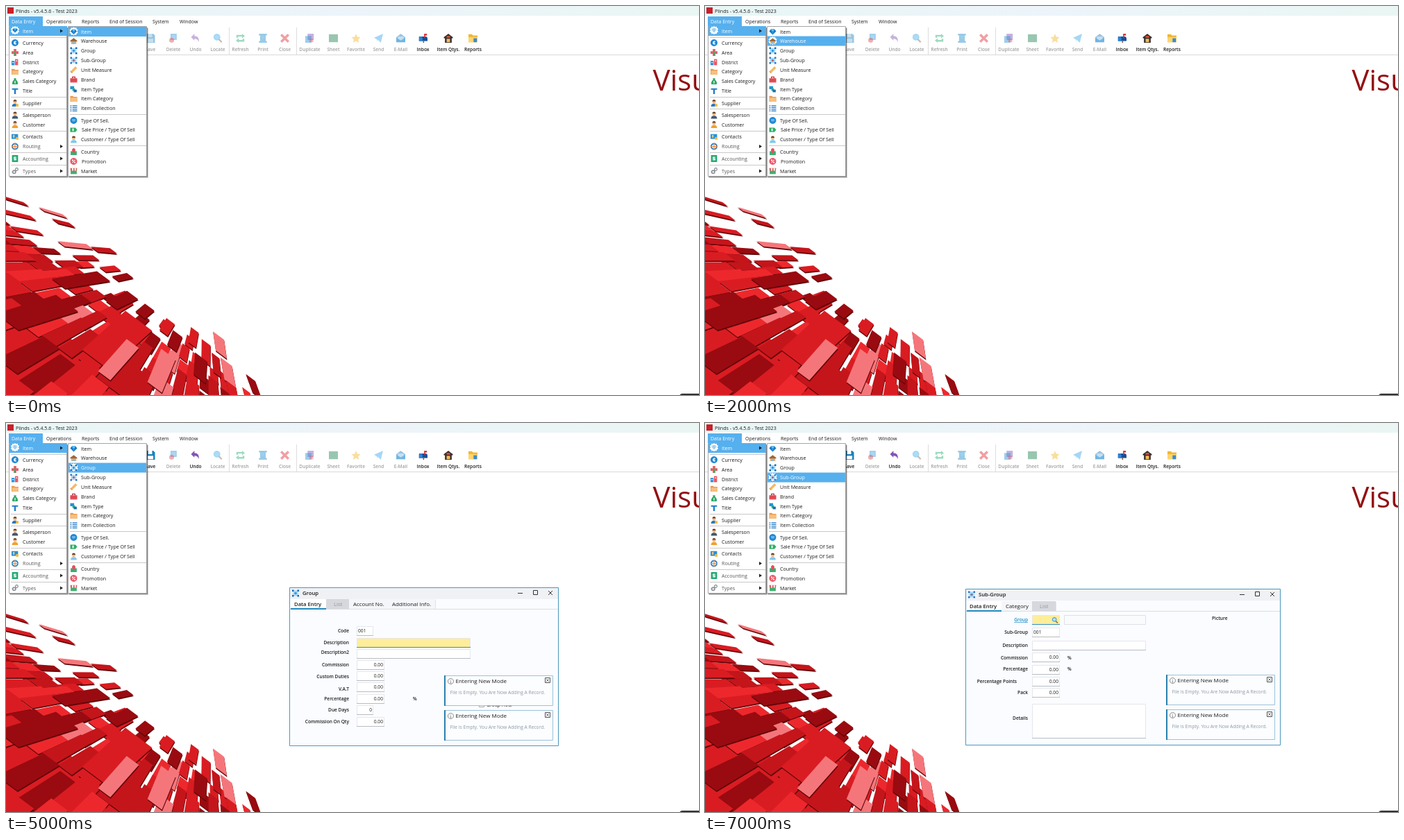
Recreate the animation shown at these times as an HTML page with a canvas. Size 998x561 px, loop 8 s.

```html
<!DOCTYPE html>
<html lang="en">
<head>
<meta charset="utf-8">
<style>
html, body { margin: 0; width: 100%; height: 100%; overflow: hidden; background: #fff; }
canvas { display: block; }
</style>
</head>
<body>
<canvas id="stage" width="998" height="561"></canvas>
<script>
const ctx = document.getElementById('stage').getContext('2d');
const BLUE = '#56b0ee', LINK = '#1a8ac6', INK = '#1c1c1c', GREY = '#999';

// Icons on a 16 x 16 grid: "colour path" layers joined by "|"
const DISC = 'M8 0A8 8 0 1 1 7.9 0Z';
const person = c => `${c} M1 16Q1 9 8 9T15 16Z|#f3b987 M8 1A4 4 0 1 1 7.9 1Z|#6b4226 M4 4Q4 0 8 0T12 4Z`;
const nodes = c => `#8fd0f5 M2 2H14V14H2Z|#fff M4 4H12V12H4Z|#2f9de4 M5 5H11V11H5Z|${c} M0 0H4V4H0ZM12 0H16V4H12ZM0 12H4V16H0ZM12 12H16V16H12Z`;
const ICONS = {
  gem: '#1678c8 M4 2H12L16 7 8 15 0 7Z|#5cc4f5 M4 2H12L10 7H6Z|#2f9de4 M6 7H10L8 15Z',
  halo: '#fff M8 -1L10 1 13 0 14 3 17 5 15 8 17 11 14 13 13 16 10 15 8 17 6 15 3 16 2 13 -1 11 1 8 -1 5 2 3 3 0 6 1Z',
  house: '#e3b06f M2 7H14V15H2Z|#a0673a M0 7L8 1 16 7V9H0Z|#8ab8d8 M5 10H11V15H5Z',
  group: nodes('#1769b5'),
  sub: nodes('#2b78c4') + '|#e45b5b M6 6H10V10H6Z',
  ruler: '#f4b966 M0 12L12 0 16 4 4 16Z|#d88b35 M0 12L1 11 5 15 4 16Z',
  bag: '#e4505a M0 5H16V15H0Z|#b8323d M4 5V1H12V5H10V3H6V5ZM0 9H16V10H0Z',
  type: '#2491d4 M0 1H9V8H0Z|#25ad83 M5 6H11V12H5Z|#1d6dac M8 9H15V15H8Z',
  folder: '#e99a4a M0 2H6L8 4H16V15H0Z|#f7c080 M1 6H16V15H1Z',
  list: '#2378c0 M0 1H3V3H0ZM5 1H16V3H5ZM0 5H3V7H0ZM5 5H16V7H5ZM0 9H3V11H0ZM5 9H16V11H5ZM0 13H3V15H0ZM5 13H16V15H5Z',
  badge: `#1f8ad6 ${DISC}|#fff M4 6H12V7H4ZM5 9H11V10H5Z`,
  coin: `#1c87d4 ${DISC}|#fff M11 4H8Q5 4 5 8T8 12H11V10H8V9H10V7H8V6H11Z`,
  cash: '#2eaf67 M0 3H12L16 8 12 13H0Z|#fff M5 5H8V11H5Z',
  area: '#e4606a M5 0H11V5H16V11H11V16H5V11H0V5H5Z|#48a860 M6 6H10V16H6Z',
  city: '#2b8fd8 M0 5H7V15H0Z|#e85a62 M8 1H15V15H8Z|#fff M10 4H13V6H10ZM2 8H5V10H2Z',
  money: '#2fa866 M5 1H11L10 4Q16 10 14 15H2Q0 10 6 4Z|#fff M7 7H9V13H7Z',
  title: '#1f7fca M1 2H15V5H10V15H6V5H1Z',
  supplier: person('#287bc1') + '|#f2bd3f M10 10H16V16H10Z',
  seller: person('#45566e'), customer: person('#f2a02f'), buyer: person('#7cc9ee'),
  contact: '#2590d8 M0 2H15V13H0Z|#f4c07f M3 4H7V10H3Z|#f5bd3e M10 9H16V15H10Z',
  route: `#2b87cc ${DISC}|#fff M8 3A5 5 0 1 1 7.9 3Z|#ef8a42 M7 0H9V16H7ZM0 7H16V9H0Z`,
  account: '#23a873 M1 0H15V16H1Z|#fff M6 4H11V6H7V7H11V12H5V10H9V9H5V4Z',
  gear: '#8c9299 M6 5A5 5 0 1 1 5.9 5ZM12 0A4 4 0 1 1 11.9 0Z|#fff M6 8A2 2 0 1 1 5.9 8ZM12 2A2 2 0 1 1 11.9 2Z',
  map: '#36ae73 M1 7H15V16H1Z|#e64e58 M8 12Q2 6 5 2T11 2 8 12Z',
  promo: `#ec5867 ${DISC}|#fff M4 11L11 4 12 5 5 12ZM4 4H7V7H4ZM9 9H12V12H9Z`,
  market: '#42ad70 M1 6H15V15H1Z|#e55a5a M0 1H16L15 7H1Z|#fff M4 1H7V7H4ZM10 1H13V7H10Z',
  save: '#187fbd M0 0H13L16 3V16H0Z|#fff M4 0H11V6H4ZM3 9H13V15H3Z',
  del: '#2c93d8 M3 0H14V11H3Z|#b9def5 M5 2H12V9H5Z|#e54b50 M5 7A4.5 4.5 0 1 1 4.9 7Z',
  undo: '#8254b5 M0 6L6 0V4Q15 4 14 15 12 9 6 9V12Z',
  lens: '#8b6b4a M9 11L11 9 16 14 14 16Z|#35a6e4 M6.5 0A6 6 0 1 1 6.4 0Z|#b5e2fa M6.5 2A4 4 0 1 1 6.4 2Z',
  refresh: '#25ae74 M1 7V2H11V0L16 4 11 8V5H4V7ZM15 9V14H5V16L0 12 5 8V11H12V9Z',
  print: '#1b8bc9 M1 0H15V3H1ZM3 3H13V13H3ZM1 13H15V16H1Z|#bfe2f4 M5 5H11V6H5ZM5 8H11V9H5Z',
  close: '#e02b35 M3 0L8 5 13 0 16 3 11 8 16 13 13 16 8 11 3 16 0 13 5 8 0 3Z',
  copy: '#7b55bd M4 0H15V11H4Z|#2b90d6 M0 4H11V16H0Z|#e95462 M7 9H14V15H7Z',
  sheet: '#1d8050 M0 1H16V15H0Z',
  star: '#f4b52b M8 0L10.4 5.4 16 6 12 10 13 16 8 13 3 16 4 10 0 6 5.6 5.4Z',
  send: '#3ba7e6 M0 7L16 0 12 16 7 11Z|#9cd6f7 M16 0L7 11 6 15 4 9Z',
  mail: '#1d7cc1 M0 6L8 0 16 6V15H0Z|#fff M3 5H13V9L8 12 3 9Z|#3da5e4 M0 7L8 12 16 7V15H0Z',
  inbox: '#174f96 M1 5H12Q16 5 16 9V13H1Z|#2d83d3 M1 13V8Q1 5 4 5T7 8V13Z|#d9363e M10 0H15V3H12V7H10Z|#86532e M8 13H10V16H8Z',
  stock: '#3a3030 M0 6L8 0 16 6V8H0ZM2 8H14V16H2Z|#e9503f M5 4H11V7H5Z|#f4be55 M5 9H11V15H5Z',
  report: '#f2b632 M0 1H6L8 3H16V15H0Z|#ffd56e M0 6H16V15H0Z|#3a8ad0 M9 8H15V15H9Z',
  clip: '#c98550 M2 2H14V16H2Z|#fff M4 5H12V14H4Z|#777 M5 0H11V4H5ZM6 7H10V8H6ZM6 10H10V11H6Z',
  bars: '#2a83c8 M0 2H3V14H0ZM6 2H9V14H6ZM12 2H15V14H12Z|#73c1ee M0 6H16V8H0Z',
  pencil: '#f0a13d M2 2H14V14H2Z|#fff M4 3L13 12 12 13 3 4Z',
  label: '#f3a84a M0 3H11L16 8 11 13H0Z',
  glasses: '#4c5560 M2 2H6V6H10V2H14L16 14H10V10H6V14H0Z',
  row: '#888 M1 1H13V3H3V12H6V14H1Z|#aaa M7 7H16V15H7Z|#fff M9 10H14V12H9Z',
};
const layers = {};
for (const name in ICONS) {
  layers[name] = ICONS[name].split('|').map(part => {
    const cut = part.indexOf(' ');
    return [part.slice(0, cut), new Path2D(part.slice(cut + 1))];
  });
}

function icon(name, x, y, size = 10, alpha = 1) {
  ctx.save();
  ctx.globalAlpha = alpha;
  ctx.translate(x - size / 2, y - size / 2);
  ctx.scale(size / 16, size / 16);
  for (const [color, path] of layers[name]) { ctx.fillStyle = color; ctx.fill(path); }
  ctx.restore();
}
function rect(x, y, w, h, color) { ctx.fillStyle = color; ctx.fillRect(x, y, w, h); }
function frame(x, y, w, h, fill, stroke, radius = 0) {
  ctx.beginPath();
  ctx.roundRect(x + .5, y + .5, w - 1, h - 1, radius);
  ctx.fillStyle = fill; ctx.fill();
  ctx.strokeStyle = stroke; ctx.lineWidth = 1; ctx.stroke();
}
function stroke(color, d, width = 1) {
  ctx.strokeStyle = color; ctx.lineWidth = width; ctx.stroke(new Path2D(d));
}
function text(s, x, y, color = INK, size = 7.1, weight = 400, align = 'left') {
  ctx.font = `${weight} ${size}px "Open Sans", "Noto Sans", sans-serif`;
  ctx.fillStyle = color; ctx.textAlign = align;
  ctx.fillText(s, x, y);
}
const bold = (s, x, y, align = 'right', color = INK) => text(s, x, y, color, 6.6, 600, align);
function link(s, x, y) {
  bold(s, x, y, 'right', LINK);
  const w = ctx.measureText(s).width;
  rect(x - w, y + 1.2, w, .7, LINK);
}
function input(x, y, w, h, value = '', right = false, active = false) {
  frame(x, y, w, h, active ? '#ffed99' : '#fff', '#e5e7ea');
  rect(x, y + h - 1, w, 1, active ? '#2b8fc6' : '#b9bcc1');
  text(value, right ? x + w - 2 : x + 2, y + h / 2 + 2, INK, 6.7, 400, right ? 'right' : 'left');
}
function check(x, y, label, color = GREY) {
  frame(x, y, 8, 8, '#fff', '#aaa');
  text(label, x + 11, y + 6.5, color, 6.8);
}

// Tiled floor seen in perspective; u runs along the horizon, d away from it
const REDS = ['#990b10', '#c4151b', '#d91c22', '#ed282d', '#f5767a'];
const VX = 290, VY = 365;
// x, y, length, width, shade
const LOOSE = [
  [13, 281, 34, 10, 1], [68, 298, 36, 10, 4], [83, 313, 26, 12, 1], [30, 324, 40, 12, 2],
  [100, 345, 42, 13, 4], [141, 352, 28, 13, 1], [115, 363, 30, 12, 1], [150, 379, 22, 12, 2],
  [108, 395, 66, 24, 0], [168, 391, 22, 12, 0], [167, 424, 34, 20, 0], [200, 440, 18, 17, 0],
  [45, 442, 90, 40, 0], [160, 482, 84, 48, 2], [232, 463, 20, 15, 2], [243, 483, 23, 17, 0],
  [270, 478, 22, 14, 2], [288, 500, 30, 16, 2], [308, 489, 28, 20, 4], [303, 518, 28, 14, 1],
  [320, 529, 33, 21, 4], [326, 555, 20, 18, 2], [357, 549, 28, 17, 0], [280, 522, 32, 22, 0],
  [224, 526, 52, 26, 4], [162, 510, 62, 22, 4],
];
function polygon(points, color, dx = 0, dy = 0) {
  ctx.beginPath();
  for (const [x, y] of points) ctx.lineTo(x + dx, y + dy);
  ctx.closePath();
  ctx.fillStyle = color; ctx.fill();
}
function tile(points, shade) {
  polygon(points, '#5e0609', .4, 1.8);
  polygon(points, REDS[shade]);
}
function drawFloor() {
  let seed = 11;
  const random = () => (seed = seed * 16807 % 2147483647) / 2147483647;
  const at = (u, d) => [VX + d * (.8 * u - .6), VY + d * (.6 * u + .8)];
  const quad = (u, v, d, e) => [at(u, d), at(v, d), at(v, e), at(u, e)];
  polygon(quad(-3, 3, 210, 1200), REDS[2]);
  for (let z = .0091; z > .0026; z -= .001) {
    for (let u = -3.4; u < 1.6; u += .13) {
      const far = z + random() * .0006, near = z - .0006 - random() * .0005;
      const left = u + random() * .04, width = .1 + random() * .04;
      const shade = [0, 0, 1, 1, 2, 2, 2, 2, 3, 3, 4][Math.floor(random() * 10.3)];
      if (1 / far > 95 + random() * 40) tile(quad(left, left + width, 1 / far, 1 / near), shade);
    }
  }
  for (const [x, y, length, width, shade] of LOOSE) {
    const r = Math.hypot(VX - x, VY - y);
    const a = (VX - x) / r * length / 2, b = (VY - y) / r * length / 2;
    const c = .4 * width, d = .3 * width;
    tile([[x - a - c, y - b - d], [x + a - c, y + b - d], [x + a + c, y + b + d], [x - a + c, y - b + d]], shade);
  }
}

const TOOLS = [
  ['Save', 'save', 208], ['Delete', 'del', 241], ['Undo', 'undo', 273], ['Locate', 'lens', 305],
  ['Refresh', 'refresh', 337.5], ['Print', 'print', 370], ['Close', 'close', 401.5],
  ['Duplicate', 'copy', 437.5], ['Sheet', 'sheet', 471.5], ['Favorite', 'star', 504],
  ['Send', 'send', 536.5], ['E-Mail', 'mail', 568.5], ['Inbox', 'inbox', 600.5],
  ['Item Qtys.', 'stock', 637], ['Reports', 'report', 672.5],
];
const ALWAYS = ['Inbox', 'Item Qtys.', 'Reports'];
function isEnabled(tool, mode) {
  if (ALWAYS.includes(tool)) return true;
  const editing = tool === 'Save' || tool === 'Undo';
  return mode === 'new' ? editing : mode === 'view' && !editing && tool !== 'Send';
}

function drawShell(mode) {
  rect(0, 0, 998, 561, '#fff');
  drawFloor();
  text('Visu', 931.5, 122, '#930f12', 42, 400);
  const bar = ctx.createLinearGradient(0, 0, 998, 0);
  bar.addColorStop(0, '#e8f6f5'); bar.addColorStop(.5, '#edf4fa'); bar.addColorStop(1, '#e9f6f3');
  rect(0, 0, 998, 14, bar);
  rect(2, 2, 9, 9, '#c8202b');
  text('Plinds - v5.4.5.6 - Test 2023', 14, 9.7);
  rect(4, 15, 49, 14, BLUE);
  text('Data Entry', 8, 25, '#fff', 7);
  [['Operations', 58], ['Reports', 109], ['End of Session', 149], ['System', 211], ['Window', 250]]
    .forEach(([s, x]) => text(s, x, 25, INK, 7));
  rect(0, 70, 998, 1, '#d9d9d9');
  rect(321, 31, 1, 39, '#ddd'); rect(418, 31, 1, 39, '#ddd');
  for (const [label, name, x] of TOOLS) {
    const on = isEnabled(label, mode);
    icon(name, x, 46.5, 13, on ? 1 : .45);
    bold(label, x, 64.7, 'center', on ? INK : '#a0a0a0');
  }
  ctx.beginPath(); ctx.roundRect(970, 559, 40, 8, 4); ctx.fillStyle = '#333'; ctx.fill();
}

const MAIN = [
  ['Item', 'gem', 36, 1], ['Currency', 'coin', 53], ['Area', 'area', 67], ['District', 'city', 81],
  ['Category', 'folder', 94.5], ['Sales Category', 'money', 108.5], ['Title', 'title', 122.5],
  ['Supplier', 'supplier', 140], ['Salesperson', 'seller', 157.5], ['Customer', 'customer', 171],
  ['Contacts', 'contact', 188.5], ['Routing', 'route', 202.5, 1], ['Accounting', 'account', 220, 1],
  ['Types', 'gear', 238, 1],
];
const SUB = [
  ['Item', 'gem', 37], ['Warehouse', 'house', 50.5], ['Group', 'group', 64.5], ['Sub-Group', 'sub', 78.5],
  ['Unit Measure', 'ruler', 92], ['Brand', 'bag', 106], ['Item Type', 'type', 120],
  ['Item Category', 'folder', 133.5], ['Item Collection', 'list', 147.5], ['Type Of Sell.', 'badge', 165],
  ['Sale Price / Type Of Sell', 'cash', 178.5], ['Customer / Type Of Sell', 'buyer', 192.5],
  ['Country', 'map', 210], ['Promotion', 'promo', 224], ['Market', 'market', 238],
];
function menuBox(x, w, rules) {
  rect(x + 2, 32, w, 216, 'rgba(0,0,0,.2)');
  rect(x + 1, 31, w, 216, 'rgba(0,0,0,.35)');
  frame(x, 29, w, 217, '#fff', '#a6a6a6');
  rules.forEach(y => rect(x + 3, y, w - 4, 1, '#c9c9c9'));
}
function drawMenus(active) {
  menuBox(4, 84, [45, 131, 148, 180, 211, 229]);
  rect(5, 29, 83, 14, BLUE);
  for (const [label, name, y, more] of MAIN) {
    const lit = label === 'Item';
    if (lit) icon('halo', 13, y - 1, 11);
    icon(name, 13, y - (lit ? 1 : 0), lit ? 8 : 10, lit && active ? .3 : 1);
    text(label, 24, y + 2.5, lit ? '#fff' : more ? '#555' : INK);
    if (more) polygon([[78, y - 2.5], [82, y], [78, y + 2.5]], '#222');
  }
  menuBox(89, 114, [156, 201]);
  SUB.forEach(([label, name, y], i) => {
    if (i === active) { rect(90, y - 7, 112, 14, BLUE); icon('halo', 97.5, y - .5, 11); }
    icon(name, 97.5, y, i === active ? 9 : 10);
    text(label, y === 178.5 || y === 224 ? 109 : 108, y + 2.5, i === active ? '#fff' : INK);
  });
}

// Tabs are [label, text x, right edge]
function drawWindow(x, y, w, h, title, name, tabs) {
  frame(x, y, w, h, '#fafcff', '#4b98bd');
  rect(x + 1, y + 1, w - 2, 16, '#f0f1f4');
  icon(name, x + 9, y + 8.5, 10);
  text(title, x + 19, y + 11, INK, 7.7, 600);
  const r = x + w, m = y + 8;
  stroke('#333', `M${r - 59} ${m + .5}h7M${r - 36.5} ${m - 3.5}h6v6h-6ZM${r - 15} ${m - 3}l6 6m0 -6l-6 6`);
  const base = y + (title === 'Sub-Group' ? 28 : 27), line = base + 4;
  rect(x + 1, line, w - 2, 1, '#d9dfe5');
  let left = x + 2;
  tabs.forEach(([label, tx, edge], i) => {
    const off = label === 'List' && title !== 'Item' && title !== 'Warehouse';
    rect(left, base - 10, edge - left, 14, off ? '#d7d8dd' : i ? '#f4f6f9' : '#fff');
    rect(edge, base - 9, 1, 13, '#dfe3e8');
    text(label, tx, base, off ? GREY : INK, i ? 7.9 : 7.7, i ? 400 : 600);
    if (!i) rect(left, line - 1, edge - left, 2, '#2289bd');
    left = edge;
  });
}
function toast(x, y) {
  frame(x, y, 157, 44, '#fbfdff', '#9cc3d8');
  rect(x, y, 2, 44, '#2b7fab');
  stroke('#555', `M${x + 9.5} ${y + 4.5}a4 4 0 1 1 -.1 0M${x + 9.5} ${y + 6.5}v1m0 1v3`, .7);
  text('Entering New Mode', x + 16.5, y + 11.2, INK, 8);
  frame(x + 145, y + 3, 8, 8, '#fff', '#555');
  stroke('#555', `M${x + 147} ${y + 5}l4 4m0 -4l-4 4`, .8);
  text('File is Empty. You Are Now Adding A Record.', x + 8.5, y + 26.5, '#8f98a3', 6.7);
}
function selectedCode(x, y, s) {
  rect(x + 1, y + 1, s.length * 4.1, 9, '#0b66b0');
  text(s, x + 1.5, y + 8.5, '#fff', 6.9);
}

function itemWindow() {
  drawWindow(293, 180, 618, 343, 'Item', 'gem', [
    ['Data Entry', 299, 345], ['Additional Info.', 351, 413], ['Quantity', 418, 454], ['Cost', 463, 488],
    ['Accounting Page', 495, 562], ['Picture', 568, 600], ['Free', 607, 631], ['Type Of Sell.', 639, 692],
    ['Replaced Items', 700, 762], ['Sub Items', 769, 811], ['Item Category', 818, 877], ['List', 886, 909]]);
  text('000003  •  Description for the item', 841, 190.5, INK, 6.7, 500, 'right');
  link('Code', 370, 231); input(375, 222, 92, 14); selectedCode(375, 222, '000003');
  bold('Description', 370, 246); input(375, 237, 172, 14, 'Description for the item');
  bold('Description 2', 370, 261); input(375, 252, 172, 14);
  [['Supplier', 'coin', '#edf5fc'], ['Group', 'group', '#edf5fc'], ['Sub-Group', 'sub', '#edf5fc'],
   ['Unit Measure', 'ruler', '#fff8ec'], ['Item Category', 'folder', '#fff5ea'], ['Brand', 'bag', '#feeeee'],
   ['Country', 'map', '#eefaf2'], ['Type', 'type', '#edf8fa'], ['Collection', 'list', '#edf5fc']]
    .forEach(([label, name, fill], i) => {
      const y = Math.round(267 + i * 15.7);
      frame(300, y, 72, 15, fill, '#d9e3ea', 2);
      icon(name, 308.5, y + 7, 10);
      bold(label, 341, y + 9.5, 'center');
      input(375, y, 37, 14); icon('lens', 405, y + 7, 8);
      frame(413, y, 134, 14, '#fafbfd', '#e0e3e8');
    });
  link('Search Barcode/Code', 408, 422); input(413, 413, 134, 14); icon('glasses', 540, 420, 9);
  rect(298, 447, 608, 52, '#d9dbe0');
  rect(298, 431, 602, 16, '#275571');
  [310, 372, 423, 473, 523, 586, 636, 686, 750, 837].forEach(x => rect(x, 431, 1, 16, '#7593a6'));
  [['Bar Code', 341], ['Inactive', 398], ['Weight', 448], ['Price', 498], ['Quantity', 554.5], ['B/C/U', 611],
   ['Pack 2', 661], ['Pack2 Saleprice', 718], ['Remarks', 793], ['Sale Price', 868]]
    .forEach(([s, x]) => bold(s, x, 441.5, 'center', '#fff'));
  [['Add Row', 299], ['Delete Row', 365]].forEach(([s, x], i) => {
    frame(x, 501, 62, 15, '#fcfdff', '#e3e7ec', 2);
    icon('row', x + 8, 509, 9);
    text(s, x + (i ? 16 : 21), 511, GREY);
  });
  link('Supplier Item No', 689, 228); input(694, 219, 155, 14); icon('lens', 842, 226, 8);
  frame(619, 237, 230, 52, '#fafcff', '#cfd5db', 2);
  bold('Sale Price', 807, 246);
  bold('Sale Currency', 693, 258); input(697, 249, 23, 14, '02'); icon('lens', 714, 256, 8);
  input(722, 249, 26, 14, 'USD'); input(752, 249, 83, 14, '5.500', true);
  bold('Pack', 693, 274); input(697, 265, 51, 14, '1.000', true); input(752, 265, 83, 14, '5.500', true);
  link('Details', 643, 310); check(795, 301, 'Without Qty.');
  input(619, 313, 230, 28);
  rect(838, 314, 10, 26, '#f0f0f0');
  polygon([[840, 321], [846, 321], [843, 317]], GREY);
  polygon([[840, 334], [846, 334], [843, 338]], GREY);
  frame(619, 348, 230, 42, '#fafcff', '#cfd5db', 2);
  ['Exp. Date', 'Color', 'Size'].forEach((s, i) => check(630, 352 + i * 12, s));
  ['Location', 'Serial #', 'Batch #'].forEach((s, i) => check(745, 352 + i * 12, s));
  frame(854, 214, 49, 176, '#fafcff', '#d3d9df', 3);
  [['Cardex', 'clip', '#f8f6f4'], ['Stock', 'bars', '#eef3fb'], ['Report', 'pencil', '#fff8f0'],
   ['Labels', 'label', '#fff6ea'], ['Sales', 'money', '#e8f8f1']].forEach(([s, name, fill], i) => {
    const y = Math.round(219 + i * 33.9);
    frame(858, y, 41, 31, fill, i === 4 ? '#a9dcc5' : '#dde2e8', 4);
    icon(name, 878.5, y + 11, 11);
    text(s, 878.5, y + 27, INK, 7, 400, 'center');
  });
}

function warehouseWindow() {
  drawWindow(393, 228, 419, 248, 'Warehouse', 'house',
    [['Data Entry', 399, 445], ['List', 454, 476], ['Additional Info.', 483, 545]]);
  link('Code', 478, 293); input(489, 284, 40, 14); selectedCode(489, 284, '001');
  ['Description', 'Description2', 'Address', 'Telephone', 'Contact'].forEach((s, i) => {
    bold(s, 478, 310 + i * 17);
    input(489, 301 + i * 17, 164, 14, i ? '' : 'Main Warehouse');
  });
}

function groupWindow() {
  drawWindow(408, 237, 388, 229, 'Group', 'group',
    [['Data Entry', 415, 461], ['List', 472, 494], ['Account No.', 500, 550], ['Additional Info.', 556, 618]]);
  // label, baseline, input top, input width, value
  [['Code', 302, 293, 24, '001'], ['Description', 318.5, 310, 164, ''], ['Description2', 333, 326, 164, ''],
   ['Commission', 351, 342, 40, '0.00'], ['Custom Duties', 367.5, 358, 40, '0.00'], ['V.A.T', 386, 374, 40, '0.00'],
   ['Percentage', 400, 391, 40, '0.00'], ['Due Days', 416, 407, 24, '0'], ['Commission On Qty', 433, 424, 40, '0.00']]
    .forEach(([label, base, y, w, value], i) => {
      bold(label, 494, base);
      input(505, y, w, 14, value, i > 0, i === 1);
    });
  bold('%', 586, 400, 'left');
  check(681, 402, 'Group Hour', INK);
  toast(631, 364); toast(631, 414);
}

function subGroupWindow() {
  drawWindow(375, 239, 454, 226, 'Sub-Group', 'sub',
    [['Data Entry', 381, 427], ['Category', 433, 471], ['List', 482, 505]]);
  link('Group', 465, 286); input(471, 277, 40, 14, '', false, true); icon('lens', 504, 284.5, 9);
  frame(517, 277, 118, 14, '#fafbfd', '#dde1e6');
  bold('Sub-Group', 465, 304); input(471, 295, 40, 14, '001');
  bold('Description', 465, 323); input(471, 314, 164, 14);
  [['Commission', 465, 341, 331], ['Percentage', 465, 357, 349], ['Percentage Points', 449, 375, 366], ['Pack', 465, 391, 382]]
    .forEach(([label, x, base, y], i) => {
      bold(label, x, base);
      input(471, y, 40, 14, '0.00', true);
      if (i < 2) bold('%', 522, base, 'left');
    });
  bold('Details', 465, 428); input(471, 405, 164, 50);
  bold('Picture', 730, 284, 'left');
  toast(664, 363); toast(664, 413);
}

const WINDOWS = [itemWindow, warehouseWindow, groupWindow, subGroupWindow];
let shown = -1;
function render(now) {
  const step = Math.floor(now % 8000 / 1000);
  if (step !== shown) {
    shown = step;
    const active = step >> 1, open = step % 2;
    drawShell(open ? active < 2 ? 'view' : 'new' : 'idle');
    if (open) WINDOWS[active]();
    drawMenus(active);
  }
}
const start = performance.now();
function tick() {
  render(performance.now() - start);
  requestAnimationFrame(tick);
}
tick();
</script>
</body>
</html>
```
